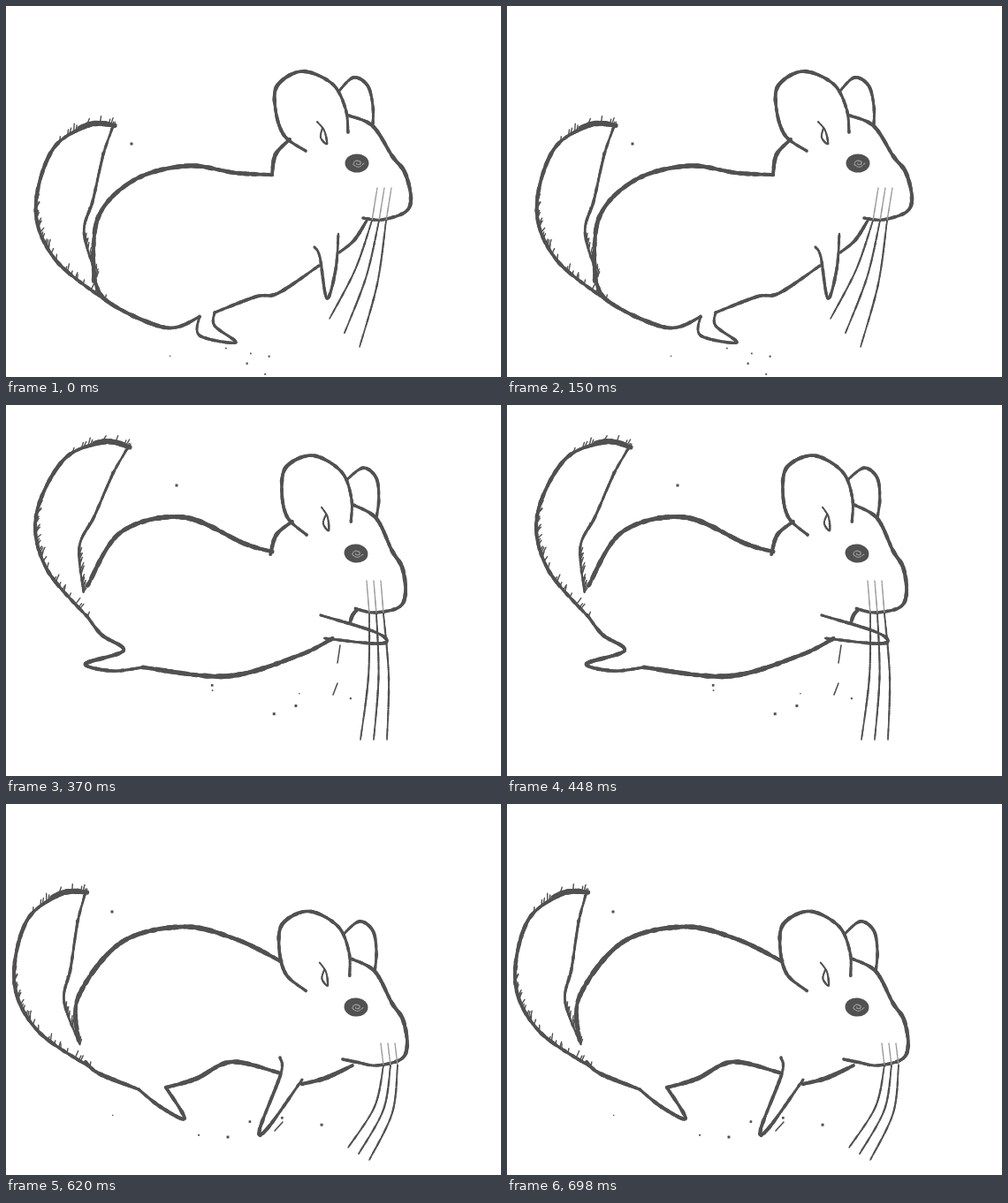
An HTML page with a canvas that plays this animation: 560x420 px, repeating every 750 ms.

```html
<!DOCTYPE html>
<html>
<head>
<meta charset="utf-8">
<style>
html, body { margin: 0; overflow: hidden; background: #fff; }
canvas { display: block; }
</style>
</head>
<body>
<canvas id="stage" width="560" height="420"></canvas>
<script>
const ctx = document.getElementById('stage').getContext('2d');
const INK = '#515151', PALE = '#999';
ctx.lineCap = 'round';

const noise = n => { const s = Math.sin(n * 12.9898) * 43758.5453; return s - Math.floor(s); };
const points = text => text.split(' ').map(p => p.split(',').map(Number));

function at(x, y, deg, draw) {
  ctx.save();
  ctx.translate(x, y);
  ctx.rotate(deg * Math.PI / 180);
  draw();
  ctx.restore();
}

function line(x1, y1, x2, y2, width, color = INK) {
  ctx.strokeStyle = color;
  ctx.lineWidth = width;
  ctx.beginPath();
  ctx.moveTo(x1, y1);
  ctx.lineTo(x2, y2);
  ctx.stroke();
}

// Catmull-Rom curve sampled in short steps
function curve(pts) {
  const out = [pts[0]];
  for (let i = 0; i < pts.length - 1; i++) {
    const b = pts[i], c = pts[i + 1], a = pts[i - 1] || b, d = pts[i + 2] || c;
    const steps = Math.ceil(Math.hypot(c[0] - b[0], c[1] - b[1]) / 2.5);
    for (let s = 1; s <= steps; s++) {
      const t = s / steps;
      out.push([0, 1].map(k => b[k] + t / 2 * (c[k] - a[k] +
        t * (2 * a[k] - 5 * b[k] + 4 * c[k] - d[k] + t * (3 * (b[k] - c[k]) + d[k] - a[k])))));
    }
  }
  return out;
}

// Uneven pen stroke that swells in the middle
function ink(width, shape, color) {
  const pts = curve(typeof shape === 'string' ? points(shape) : shape);
  for (let i = 1; i < pts.length; i++) {
    const swell = 0.85 + 0.25 * Math.sin(Math.PI * i / pts.length);
    line(...pts[i - 1], ...pts[i], width * (swell + 0.4 * (noise(i) - 0.5)), color);
  }
  return pts;
}

function fur(width, shape, lean) {
  ink(width, shape).forEach(([x, y], i) => {
    if (noise(i + lean) < 0.4) line(x, y, x + lean * noise(i * 3), y - 4 - 6 * noise(i * 7), 1.4);
  });
}

function tail(x, y, deg) {
  at(x, y, deg, () => {
    fur(3.8, '0,-198 -23,-199 -68,-168 -84,-98 -59,-43 0,0', 4);
    fur(2.8, '-2,-196 -11,-165 -20,-112 -28,-75 -11,-26', 2);
    ink(5, '0,-198 -23,-199 -40,-193');
  });
}

function eye() {
  ctx.fillStyle = INK;
  ctx.beginPath();
  ctx.ellipse(0, 0, 13.5, 10.5, 0, 0, 7);
  ctx.fill();
  const spiral = [0, 1, 2, 3, 4, 5, 6, 7].map(i => [1 + (7 - i * 0.8) * Math.cos(i * 1.4), (5 - i * 0.6) * Math.sin(i * 1.4)]);
  ink(1, spiral, PALE);
}

function head(x, y, deg, neck = true) {
  at(x, y, deg, () => {
    ink(3.6, '-58,-14 -82,-31 -92,-60 -90,-88 -62,-104 -28,-90 -13,-62 -10,-35');
    ink(3.2, '-21,-81 -4,-97 12,-88 18,-65 18,-44');
    ink(3.8, '-9,-54 18,-42 40,-8 54,10 61,38 55,55 28,64 7,62');
    ink(2, '-45,-47 -37,-37 -34,-22 -41,-29 -39,-40');
    if (neck) ink(3.8, '-76,-27 -92,-10 -96,13');
    eye();
  });
}

// Three strands fanned from the muzzle: faint over the cheek, dark below it
function whiskers([topX, topY], [rootX, rootY], [tipX, tipY], fanX, fanY, bend) {
  for (const i of [-1, 0, 1]) {
    const root = [rootX + 8 * i, rootY];
    const tip = [tipX + fanX * i, tipY + fanY * i];
    const middle = [(root[0] + tip[0]) / 2 + bend, (root[1] + tip[1]) / 2];
    ink(1.2, [[topX + 8 * i, topY], root], PALE);
    ink(1.9, [root, middle, tip]);
  }
}

// One speck over the back, the rest strewn on the ground
function specks(x, y, seed) {
  ctx.fillStyle = INK;
  ctx.fillRect(x - 1.5, y - 1.5, 3, 3);
  for (let i = 1; i < 7; i++) {
    const size = 1 + 2 * noise(seed + i);
    ctx.fillRect(x + 240 * noise(seed * i), y + 225 + 35 * noise(seed + i * 5), size, size);
  }
}

function upright() {
  head(397, 178, 0);
  ink(4.5, '301,191 260,189 205,181 145,197 104,240 99,312');
}

function sit() {
  upright();
  tail(112, 333, 3.2);
  ink(4, '99,300 113,333 180,364 219,352');
  ink(3.4, '236,347 283,329 308,325 354,294');
  ink(3, '219,351 219,373 260,381 236,362 236,347');
  ink(3, '349,273 355,284 363,331 373,298 376,258');
  ink(3.2, '377,279 394,265 408,243');
  whiskers([428, 206], [422, 243], [383, 370], 17, 16, 5);
  specks(142, 156, 3);
}

function leap() {
  at(2, -28.5, 0, upright);
  tail(112, 307, -10);
  ink(4, '118,309 140,318 169,324');
  ink(4, '169,324 155,338 135,353 172,344 200,330');
  ink(4.2, '200,330 270,313 310,296 362,263');
  ink(3.2, '353,236 415,252 429,261 415,265 355,264');
  ink(3.2, '408,212 402,226 387,244');
  whiskers([423, 188], [436, 212], [507, 357], 13, -9, 3);
  line(377, 272, 375, 292, 1.6);
  line(375, 315, 370, 328, 1.6);
  specks(144, 128, 5);
}

function stretch() {
  head(396, 168, 7);
  tail(92, 240, 14);
  ink(4.8, '301,166 270,157 200,127 130,144 92,205');
  ink(3.8, '91,238 108,260 133,278 90,293 120,301 155,297');
  ink(4.8, '155,297 250,307 330,284 370,264');
  ink(3.2, '356,238 415,256 431,267 415,270 360,264');
  ink(4, '397,232 392,238 389,247');
  whiskers([416, 199], [419, 236], [416, 379], 15, 0, 4);
  line(378, 272, 375, 292, 1.6);
  line(375, 315, 370, 328, 1.6);
  specks(193, 91, 7);
}

function land() {
  head(409, 235, 24);
  tail(92, 232, 26.7);
  ink(4.8, '320,193 250,142 180,127 115,160 92,205');
  ink(4, '84,225 95,247 118,268');
  ink(3.4, '118,268 123,300 135,333 148,291');
  ink(4.4, '148,291 180,299 280,297 335,310');
  ink(3.4, '341,282 388,322 398,338 388,340 335,310');
  ink(3.6, '390,298 380,293 366,303');
  whiskers([406, 272], [412, 313], [420, 410], 16, 4, 3);
  line(347, 323, 336, 339, 1.6);
  line(325, 361, 316, 371, 1.8);
  specks(193, 91, 7);
}

function crouch() {
  head(396, 230, 4.5, false);
  tail(95, 298, -1);
  ink(4.8, '311,178 260,153 200,139 130,157 82,218 82,268');
  ink(4, '90,292 105,305 150,323');
  ink(3.6, '150,323 175,343 202,356 181,321');
  ink(4.4, '181,321 215,311 255,292 308,304');
  ink(3.4, '310,287 311,305 287,368 296,367 335,312');
  ink(4.2, '335,317 362,310 392,296');
  ink(3.4, '381,289 400,293');
  whiskers([432, 271], [435, 296], [399, 396], 12, 7, 10);
  line(313, 360, 304, 370, 1.6);
  specks(120, 122, 9);
}

const poses = [[250, sit], [370, leap], [500, stretch], [620, land], [750, crouch]];
const start = performance.now();

function frame() {
  const t = (performance.now() - start) % 750;
  ctx.fillStyle = '#fff';
  ctx.fillRect(0, 0, 560, 420);
  poses.find(([end]) => t < end)[1]();
  requestAnimationFrame(frame);
}
frame();
</script>
</body>
</html>
```
